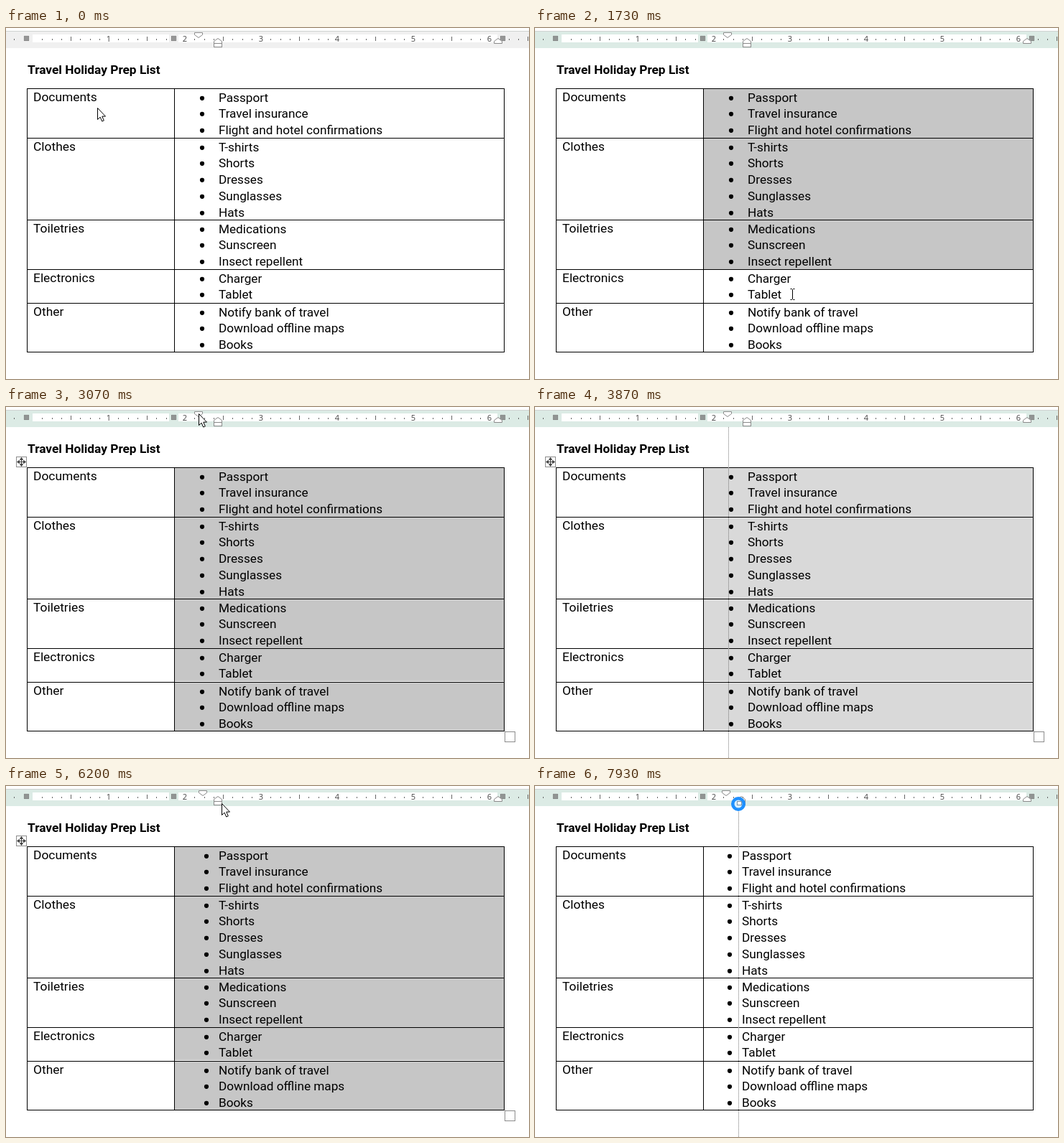
These frames come from a looping animation (728 px wide and 489 px high, 8000 ms). An HTML page with a canvas:

```html
<!DOCTYPE html>
<html lang="en">
<head>
<meta charset="utf-8">
<title>Travel Holiday Prep List</title>
<style>
html, body { margin: 0; width: 728px; height: 489px; overflow: hidden; background: #fff; }
canvas { display: block; }
</style>
</head>
<body>
<canvas id="stage" width="728" height="489"></canvas>
<script>
const g = document.getElementById('stage').getContext('2d');
const LOOP = 8000, STEP = 200 / 3;
const FONT = 'Roboto, "Liberation Sans", sans-serif';
const UI = '"Open Sans", "Noto Sans", sans-serif';
const LEFT = 29, SPLIT = 234, RIGHT = 693, TOP = 84;

const list = {
  Documents: ['Passport', 'Travel insurance', 'Flight and hotel confirmations'],
  Clothes: ['T-shirts', 'Shorts', 'Dresses', 'Sunglasses', 'Hats'],
  Toiletries: ['Medications', 'Sunscreen', 'Insect repellent'],
  Electronics: ['Charger', 'Tablet'],
  Other: ['Notify bank of travel', 'Download offline maps', 'Books']
};

// each row is as tall as its items need
let edge = TOP;
const rows = Object.entries(list).map(([name, items]) => {
  const top = Math.ceil(edge);
  edge += 22.4 * items.length + 1.71;
  return { name, items, top, bottom: Math.ceil(edge), fillEnd: Math.round(edge) };
});

// pointer key points: time, x, y
const path = [
  [70, 127, 111], [500, 347, 404], [870, 310, 112], [1250, 298, 98], [1730, 358, 371],
  [1930, 357, 418], [2330, 343, 290], [2670, 290, 48], [3070, 268, 9], [5470, 268, 9],
  [6000, 302, 26], [6200, 300, 24], [6530, 297, 17], [7000, 295, 24]
];

const during = (t, from, to) => t >= from && t < to;
const glide = (t, t0, t1, a, b) => a + (b - a) * Math.min(1, Math.max(0, (t - t0) / (t1 - t0)));

function pointer(t) {
  const i = Math.max(1, path.findIndex(p => p[0] >= t));
  const end = t > path.at(-1)[0] ? path.length - 1 : i;
  const [t0, x0, y0] = path[end - 1], [t1, x1, y1] = path[end];
  return [Math.round(glide(t, t0, t1, x0, x1)), Math.round(glide(t, t0, t1, y0, y1))];
}

function rect(x, y, w, h, fill, stroke) {
  if (fill) { g.fillStyle = fill; g.fillRect(x, y, w, h); }
  if (stroke) { g.strokeStyle = stroke; g.lineWidth = 1; g.strokeRect(x + .5, y + .5, w - 1, h - 1); }
}

function button(x, y, w, h, fill) {
  g.beginPath();
  g.roundRect(x + .5, y + .5, w - 1, h - 1, 3);
  g.fillStyle = fill;
  g.fill();
  g.strokeStyle = '#777';
  g.lineWidth = 1;
  g.stroke();
}

function shape(d, x, y, fill, stroke, width = 1) {
  const p = new Path2D(d);
  g.save();
  g.translate(x, y);
  if (fill) { g.fillStyle = fill; g.fill(p); }
  if (stroke) { g.strokeStyle = stroke; g.lineWidth = width; g.stroke(p); }
  g.restore();
}

function disc(x, y, r, fill) {
  g.fillStyle = fill;
  g.beginPath();
  g.arc(x, y, r, 0, 7);
  g.fill();
}

function text(s, x, y, font, fill = '#000', align = 'left') {
  g.font = font;
  g.fillStyle = fill;
  g.textAlign = align;
  g.fillText(s, x, y);
}

function ruler(tint, first, left) {
  const inch = 106, zero = 37;
  rect(0, 4, 728, 24, tint);
  rect(0, 4, 728, 1, '#cfd3d1');
  rect(zero, 9, 190, 11, '#fff');
  rect(240, 9, 444, 11, '#fff');
  for (let i = -2; i <= 52; i++) {
    const x = Math.round(zero + i * inch / 8);
    if (i % 8 === 0 && i > 0) text(i / 8, x, 19, '11px ' + UI, '#444', 'center');
    else if (i % 8 === 4) rect(x, 12, 1, 6, '#666');
    else if (i) rect(x, 15, 1, 2, '#666');
  }
  for (const x of [LEFT, SPLIT, RIGHT - 1]) {
    rect(x - 5, 10, 9, 9, tint);
    for (let i = 0; i < 8; i += 2) {
      rect(x - 4 + i, 11, 1, 7, '#777');
      rect(x - 4, 11 + i, 7, 1, '#777');
    }
  }
  const up = 'M-5.5 0v-3L0-7l5.5 4v3z', down = 'M-5.5 0v3L0 7l5.5-4v-3z';
  shape(down, first, 6.5, '#fff', '#8a8a8a');
  shape(up, left, 21.5, '#fff', '#8a8a8a');
  rect(left - 6, 21, 12, 6, '#fff', '#8a8a8a');
  shape(up, 685, 21.5, '#fff', '#8a8a8a');
}

function table(selected, shade, bulletX, textX) {
  text('Travel Holiday Prep List', 30, 64, 'bold 17.3px ' + FONT);
  rows.forEach(({ name, items, top, bottom, fillEnd }, i) => {
    if (i < selected) rect(SPLIT + 1, top + 1, RIGHT - SPLIT - 1, fillEnd - top - 1, shade);
    text(name, LEFT + 9, top + 18, '17.4px ' + FONT);
    items.forEach((item, j) => {
      const y = top + 13 + Math.floor(j * 22.75);
      disc(bulletX, y + .8, 3.1, '#000');
      text(item, textX, y + 6, '17.2px ' + FONT);
    });
    rect(LEFT, top, RIGHT - LEFT + 1, bottom - top + 1, null, '#000');
  });
  rect(SPLIT, TOP, 1, rows.at(-1).bottom - TOP, '#000');
}

function handles() {
  rect(14, 69, 15, 15, '#fff', '#8c8c8c');
  g.save();
  g.translate(21.5, 76.5);
  for (let i = 0; i < 4; i++) {
    g.rotate(Math.PI / 2);
    shape('M0 0h5M6 0l-3-2v4z', 0, 0, '#444', '#444');
  }
  g.restore();
  rect(694, 452, 15, 15, '#fff', '#8c8c8c');
}

function chevron(x, y) {
  shape('M-2.5-1.5L0 1l2.5-2.5', x, y, null, '#444');
}

function bars(x, y, n, w, gap) {
  for (let i = 0; i < n; i++) rect(x, y + i * gap, w, 1, '#444');
}

function grid(x, y, w, h, cols) {
  rect(x, y, w, h, '#fff', '#555');
  for (let i = 1; i < cols; i++) rect(x + Math.floor(w * i / cols), y, 1, h, '#555');
  rect(x, y + Math.floor(h / 2), w, 1, '#555');
}

function toolbar(alpha) {
  g.save();
  g.globalAlpha = alpha;
  g.shadowColor = 'rgba(0,0,0,.3)';
  g.shadowBlur = 6;
  g.shadowOffsetY = 2;
  rect(357, 331, 380, 66, '#fafafa');
  g.shadowColor = 'transparent';
  rect(357, 331, 380, 66, null, '#dcdcdc');

  // upper line: font, size, lists
  button(362, 337, 77, 24, '#fff');
  button(441, 337, 45, 24, '#fff');
  g.save();
  g.beginPath();
  g.rect(363, 338, 63, 22);
  g.clip();
  text('Orvel (Body)', 365, 353, '12px ' + UI, '#222');
  g.restore();
  text('12', 444, 353, '12px ' + UI, '#222');
  text('A', 491, 355, '16px ' + UI, '#333');
  shape('M-2.5 1.5L0-1.5l2.5 3', 504.5, 343.5, null, '#2b7cd3', 1.2);
  text('A', 517, 354, '13px ' + UI, '#333');
  shape('M-2-1L0 1.5 2-1', 528, 344, null, '#2b7cd3', 1.2);
  button(536, 337, 37, 24, '#e4e4e4');
  rect(557, 338, 1, 22, '#888');
  bars(545, 343, 3, 9, 6);
  bars(585, 343, 3, 9, 6);
  for (let i = 0; i < 3; i++) {
    rect(540, 342 + i * 6, 3, 3, '#2b7cd3');
    text(i + 1, 578, 346 + i * 6, '6px ' + UI, '#2b7cd3');
  }

  // lower line: style, colours, borders
  text('B', 368, 383, 'bold 14px ' + UI, '#333');
  text('I', 394, 383, 'italic 15px "Noto Serif", serif', '#333');
  for (let i = 0; i < 4; i++) rect(414 + i % 2 * 2, 372 + i * 4, 14 - i % 2 * 4, 1, '#444');
  shape('M0 10L8 0l3 3-8 8z', 442, 370, '#fff', '#555');
  rect(438, 383, 16, 4, '#ff0');
  text('A', 479, 381, '14px ' + UI, '#333');
  rect(476, 383, 16, 4, '#e60000');
  shape('M0 6l6-6 6 6-6 5z', 517, 371, '#fff', '#555');
  disc(530, 380, 1.6, '#2b7cd3');
  rect(515, 383, 15, 4, '#fff', '#888');
  button(551, 366, 37, 24, '#e4e4e4');
  rect(573, 367, 1, 22, '#888');
  grid(554, 371, 15, 15, 2);
  shape('M0 6l7-6 3 4-6 6z', 595, 374, '#f0a050', '#c56a18');
  shape('M0 4l4-4 2 2-4 4z', 603, 371, '#fff', '#555');

  for (const x of [432, 479, 564, 603, 652, 692]) chevron(x, 349);
  for (const x of [462, 501, 540, 580]) chevron(x, 378);

  // large buttons
  rect(613, 337, 1, 54, '#d5d5d5');
  rect(697, 337, 1, 54, '#d5d5d5');
  grid(625, 339, 22, 20, 3);
  rect(625, 344, 22, 7, '#58a9e8', '#2b7cd3');
  shape('M0 0v11m-3-3l3 3 3-3', 636, 350, null, '#2b7cd3', 1.5);
  grid(666, 339, 21, 19, 3);
  shape('M0 0l10 10M10 0L0 10', 678, 350, null, '#d83b2d', 1.6);
  shape('M11 0H0v12h3v5l5-5h3', 717, 344, '#fff', '#555');
  shape('M-5 0H6M0-6V5', 721, 343, null, '#20a050', 2);
  text('Insert', 635, 380, '11.5px ' + UI, '#222', 'center');
  text('Delete', 675, 380, '11.5px ' + UI, '#222', 'center');
  text('New', 714, 373, '11.5px ' + UI, '#222');
  text('Comment', 702, 388, '11.5px ' + UI, '#222');
  g.restore();
}

function guide(x) {
  g.setLineDash([1, 1]);
  shape('M.5 28V489', Math.round(x), 0, null, '#777');
  g.setLineDash([]);
}

function arrow(x, y) {
  shape('M.5.5v16l3.6-3.4 2.6 5.9 2.6-1.1-2.5-5.8h4.7z', x, y, '#fff', '#000');
}

function beam(x, y) {
  shape('M-2.5-7.5h2l1 1 1-1h2M.5-6.5v13M-2.5 7.5h2l1-1 1 1h2', x, y, null, '#000');
}

function busy(x, y) {
  disc(x, y, 10, '#1e90ff');
  disc(x, y, 5.5, '#d8efff');
  rect(x - 2, y - 4, 7, 6, '#fff', '#7893ac');
}

function draw(t) {
  const [x, y] = pointer(t);
  const picked = during(t, 2000, 4000) || during(t, 5600, 7800);
  // while dragging, the selection trails the pointer a little
  const reach = during(t, 1330, 2000) ? pointer(t - 100)[1] : 0;
  const selected = picked ? rows.length : rows.filter(r => r.top < reach).length;
  const shade = during(t, 3870, 4000) || t >= 7730 ? '#d9d9d9' : '#c6c6c6';
  const hanging = Math.round(glide(t, 7800, 7930, 0, -8));
  const indent = Math.round(glide(t, 4200, 4330, 0, 6)) + hanging;

  rect(0, 0, 728, 489, '#fff');
  ruler(t < 1270 ? '#f0f0f0' : '#dcebe5', 268 + indent, 295 + hanging);
  table(selected, shade, 273 + indent, 296 + hanging);
  if (during(t, 1000, 1270) || picked) handles();
  if (during(t, 2130, 2600)) toolbar(glide(t, 2400, 2600, 1, 0));
  if (during(t, 3400, 5470)) guide(glide(t, 3800, 4330, 268, 276));
  if (t >= 7530) guide(glide(t, 7730, 7930, 295, 283));

  if (t >= 7930) busy(283, 25);
  else if (during(t, 400, 2070)) beam(x, y);
  else if (!during(t, 3870, 5530) && t < 7730) arrow(x, y);
}

const start = performance.now();
function tick() {
  const t = (performance.now() - start) % LOOP;
  draw(Math.round(Math.floor((t + 4) / STEP) % 120 * STEP / 10) * 10);
  requestAnimationFrame(tick);
}
tick();
</script>
</body>
</html>
```
